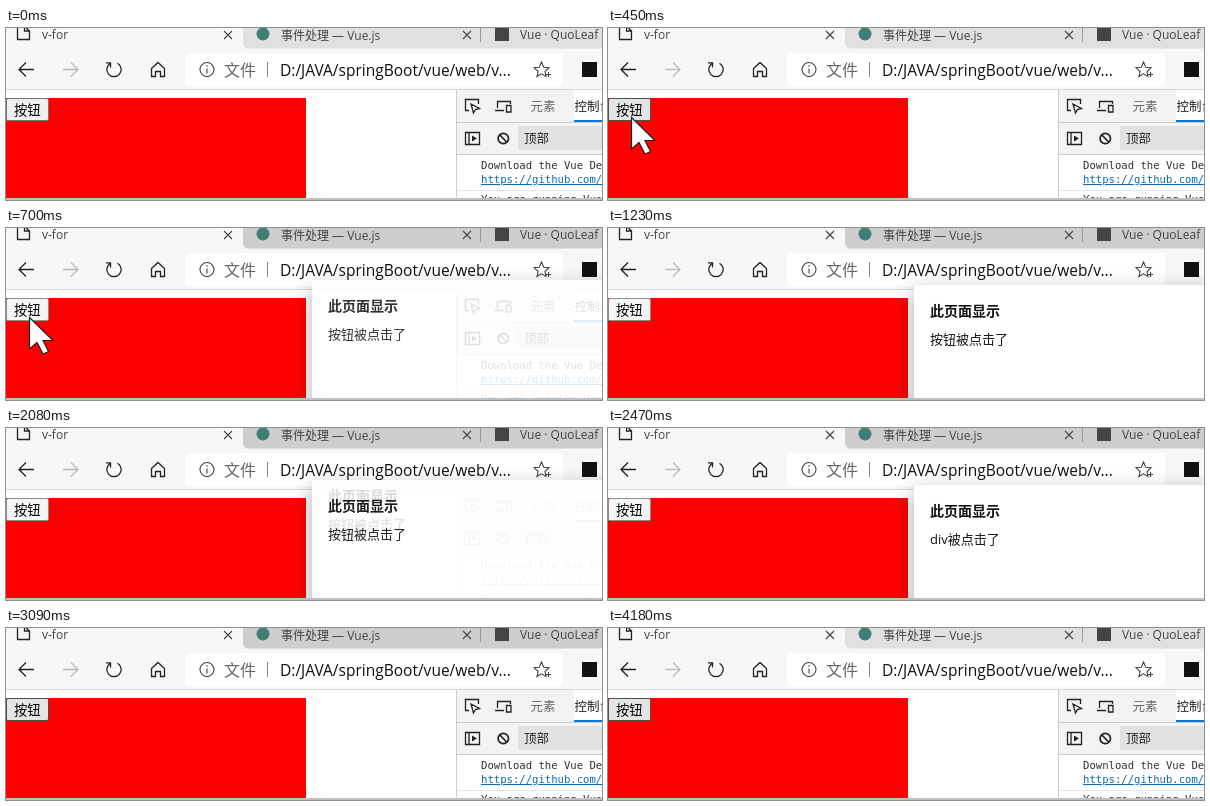
An HTML page that plays this animation: 596 px wide and 172 px high, repeating every 4.27 s.

```html
<!DOCTYPE html>
<html lang="zh-CN">
<head>
<meta charset="utf-8">
<title>v-for</title>
<style>
  html, body { margin: 0; width: 100%; height: 100%; overflow: hidden; background: #fff; }
  #stage { position: relative; width: 596px; height: 172px; overflow: hidden; }
  svg { position: absolute; left: 0; top: 0; display: block; }
  text, #dialog { font-family: "Open Sans", "Noto Sans CJK SC", "Noto Sans CJK", sans-serif; }
  .line { fill: none; stroke: #222; stroke-width: 1.3; }
  .thin { stroke-width: 1.1; stroke: #444; }
  .tab { font-size: 12px; fill: #444; }
  .tool { font-size: 12.5px; }
  .log { font: 10.6px "DejaVu Sans Mono", monospace; fill: #303030; }

  #dialog {
    position: absolute; left: 306px; top: 57px; width: 448px; height: 150px;
    border-radius: 4px; background: #fff; color: #111;
    box-shadow: 0 8px 22px rgba(0, 0, 0, .36);
    line-height: 20px; white-space: nowrap;
  }
  #dialog b, #dialog span { position: absolute; left: 16px; }
  #dialog b { top: 16px; font-size: 14px; }
  #dialog span { top: 44px; font-size: 13px; }

  #dialog, #first, #second, #cursor, #tabs, #button rect { animation: 4270ms step-end infinite; }
  #dialog { animation-name: dialog; }
  #first { animation-name: first; }
  #second { animation-name: second; }
  #cursor { animation-name: cursor; }
  #tabs { animation-name: tabs; }
  #button rect { animation-name: button; }

  @keyframes dialog {
    0%     { opacity: 0; transform: translateY(-16px); }
    14.28% { opacity: .35; transform: translateY(-16px); }
    16.39% { opacity: .86; transform: translateY(-5px); }
    18.03% { opacity: 1; transform: none; }
    48.71% { opacity: .96; transform: translateY(-5px); text-shadow: 0 -10px 1px rgba(0, 0, 0, .16); }
    50.58% { opacity: .5; transform: translateY(-12px); text-shadow: none; }
    52.45% { opacity: .08; transform: translateY(-18px); }
    54.09% { opacity: .35; transform: translateY(-16px); }
    55.97% { opacity: .86; transform: translateY(-5px); }
    57.84% { opacity: 1; transform: none; }
    68.85% { opacity: .96; transform: translateY(-5px); }
    70.72% { opacity: .5; transform: translateY(-12px); }
    72.36%, 100% { opacity: 0; transform: translateY(-18px); }
  }
  @keyframes first {
    0% { visibility: visible; }
    54.09%, 100% { visibility: hidden; }
  }
  @keyframes second {
    0% { visibility: hidden; }
    54.09%, 100% { visibility: visible; }
  }
  @keyframes cursor {
    0%     { transform: translate(200px, 180px); }
    1.63%  { transform: translate(140px, 162px); }
    3.51%  { transform: translate(92px, 136px); }
    5.15%  { transform: translate(58px, 112px); }
    7.02%  { transform: translate(36px, 98px); }
    8.66%  { transform: translate(25px, 91px); }
    10.53% { transform: translate(23px, 89px); }
    26.93% { transform: translate(375px, 156px); }
    28.8%, 100% { transform: translate(420px, 200px); }
  }
  /* The tab strip darkens while the browser window has focus. */
  @keyframes tabs {
    0%     { fill: #e0e0e0; }
    12.41% { fill: #cdcdcd; }
    97.89%, 100% { fill: #e0e0e0; }
  }
  @keyframes button {
    0%     { fill: #efefef; stroke: #767676; }
    8.66%  { fill: #e5e5e5; stroke: #4f4f4f; }
    14.28% { fill: #f5f5f5; stroke: #8d8d8d; }
    72.36%, 100% { fill: #e5e5e5; stroke: #4f4f4f; }
  }
</style>
</head>
<body>
<div id="stage">
  <svg width="596" height="172" viewBox="0 0 596 172">
    <defs>
      <path id="close" d="M-4 -4L4 4M4 -4L-4 4" class="line thin"/>
    </defs>

    <!-- tabs -->
    <rect width="596" height="62" fill="#f7f7f7"/>
    <path id="tabs" d="M237 0H596V20.5H243Q237 20.5 237 14.5Z" fill="#e0e0e0"/>
    <path d="M474.5 0V14" stroke="#999"/>
    <path d="M11.5 -2V11.5H23.5V3L18.5 -2M18.5 -2V3H23.5" class="line"/>
    <use href="#close" x="222" y="7"/>
    <use href="#close" x="461" y="7"/>
    <circle cx="257" cy="6" r="6.5" fill="#3f7f74"/>
    <rect x="489" y="0" width="14" height="13" fill="#444"/>
    <text class="tab" x="36" y="11">v-for</text>
    <text class="tab" x="275" y="11.5">事件处理 — Vue.js</text>
    <text class="tab" x="514" y="11">Vue · QuoLeaf</text>

    <!-- toolbar -->
    <rect x="179" y="25" width="378" height="33" rx="4" fill="#fff"/>
    <path d="M28 41.5H13M20 34.5L13 41.5L20 48.5" class="line"/>
    <path d="M57 41.5H72M65 34.5L72 41.5L65 48.5" class="line" style="stroke:#bbb"/>
    <path d="M104.5 35.2A7.2 7.2 0 1 0 111.5 35.2M104.5 39.5V34.8H100" class="line"/>
    <path d="M145.5 40.5L152 34.5L158.5 40.5V48.5H154.5V43.5H149.5V48.5H145.5Z" class="line"/>
    <circle cx="201" cy="41.5" r="7" class="line thin"/>
    <path d="M201 40.5V45.5M201 37.3V38.8" class="line thin"/>
    <text x="218" y="47.5" font-size="16" fill="#666">文件</text>
    <path d="M261.5 34V49" stroke="#888"/>
    <text x="274" y="47.5" font-size="15.5" fill="#111">D:/JAVA/springBoot/vue/web/v...</text>
    <path d="M535.5 34L537.7 39.3L543 39.8L539 43.5L540 48.5L535.5 45.8L531 48.5L532.2 43.5L528 39.8L533.3 39.3ZM540 46.5H545M542.5 44V49" class="line thin"/>
    <rect x="576" y="34" width="15" height="15" fill="#111"/>

    <!-- page -->
    <rect y="62" width="596" height="110" fill="#fff"/>
    <path d="M0 61.5H596" stroke="#d8d8d8"/>
    <rect y="70" width="300" height="102" fill="#f00"/>
    <g id="button">
      <rect x=".5" y="70.5" width="42" height="22" rx="1.5" fill="#efefef" stroke="#767676"/>
      <text x="8" y="86.5" font-size="13.33">按钮</text>
    </g>

    <!-- developer tools -->
    <rect x="451" y="62" width="145" height="64" fill="#f3f3f3"/>
    <rect x="568" y="62" width="28" height="32" fill="#fff"/>
    <path d="M450.5 62V172M451 94.5H596M451 126.5H596" stroke="#ccc"/>
    <rect x="568" y="92" width="28" height="2" fill="#0078d4"/>
    <path d="M463 82.5H459.5V71.5H472.5V76M465 76L473.5 80.5L469.5 81.5L467.5 85Z" class="line"/>
    <path d="M491.5 80V73.5H504.5V76M489 82.5H498M500.5 77.5H505V84H500.5Z" class="line"/>
    <text class="tool" x="524.5" y="82.5" fill="#666">元素</text>
    <text class="tool" x="568.5" y="82.5" fill="#222">控制台</text>
    <path d="M459.5 104.5H473.5V116.5H459.5ZM463 104.5V116.5" class="line"/>
    <path d="M466 107.5L471 110.5L466 113.5Z" fill="#222"/>
    <path d="M493.5 106.5L501 114.5M502.5 110.5A5.2 5.2 0 1 1 492.1 110.5A5.2 5.2 0 1 1 502.5 110.5" class="line" style="stroke-width:1.7"/>
    <rect x="512" y="98" width="84" height="24" rx="2" fill="#e1e1e1"/>
    <text class="tool" x="518" y="114.5" fill="#222">顶部</text>
    <text class="log" x="475" y="141">Download the Vue Devtools</text>
    <text class="log" x="475" y="155" style="fill:#0b6cb8;text-decoration:underline">https://github.com/vuejs</text>
    <path d="M451 162.5H596" stroke="#e8e8e8"/>
    <text class="log" x="475" y="175">You are running Vue in</text>
  </svg>

  <div id="dialog">
    <b>此页面显示</b>
    <span id="first">按钮被点击了</span>
    <span id="second">div被点击了</span>
  </div>

  <svg width="596" height="172" viewBox="0 0 596 172">
    <path id="cursor" d="M.5 .5V32L8 25.5L14 37L19.5 34.5L14 23.5H24Z" fill="#fff" stroke="#222" stroke-width="1.2"/>
    <rect y="170" width="596" height="2" fill="#bfbfbf"/>
  </svg>
</div>
</body>
</html>
```
